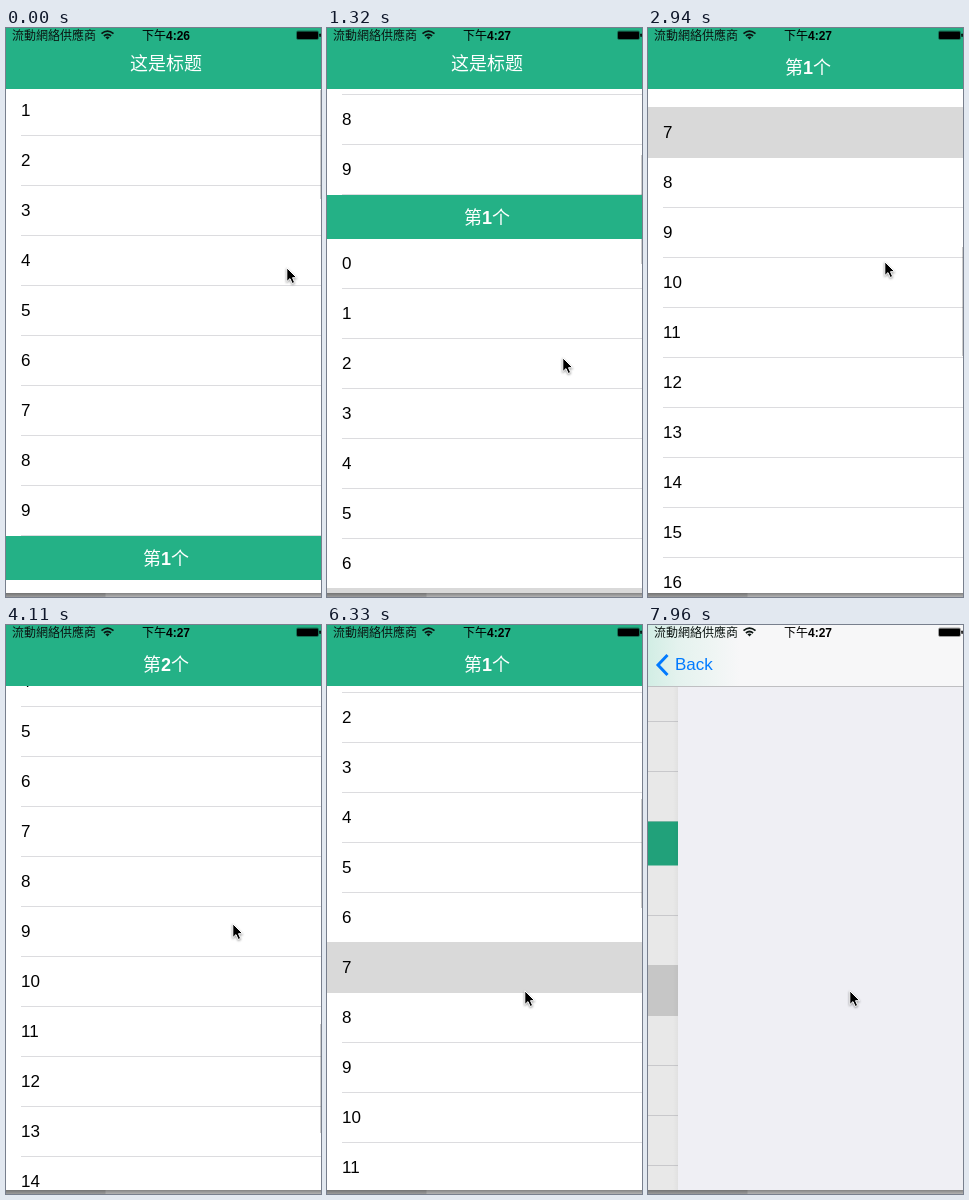
These frames come from a looping animation (315x569 px, 8000 ms). An HTML page:

```html
<!DOCTYPE html>
<html lang="zh-Hans">
<head>
<meta charset="utf-8">
<title>Sticky section list</title>
<style>
  html, body { margin: 0; width: 315px; height: 569px; overflow: hidden; background: #fff; }
  body, div { font-family: "Liberation Sans", "Noto Sans CJK SC", sans-serif; }
  #stage { position: relative; width: 315px; height: 569px; overflow: hidden; }
  #stage div, #stage svg { position: absolute; }
  #list { left: 0; top: 0; width: 320px; height: 569px; background: #fff; }
  .row { left: 0; width: 320px; height: 50px; font-size: 17px; line-height: 50px; color: #000; text-indent: 15px; }
  .row::after { content: ""; position: absolute; left: 15px; right: 0; top: 49px; height: 1px; background: #dcdcdf; }
  .row.on { top: -1px; height: 51px; line-height: 52px; background: #d9d9d9; z-index: 1; }
  .row.on::after { display: none; }
  .head, #nav { left: 0; width: 320px; background: #24b186; color: #fff; font-size: 18px; font-weight: 500; text-align: center; }
  .head { top: 0; height: 44px; line-height: 46px; z-index: 2; }
  #nav { top: 0; overflow: hidden; z-index: 3; }
  #nav div { left: 0; top: 13px; width: 320px; line-height: 46px; }
  #thumb { left: 314px; top: 0; width: 2px; height: 109px; background: rgba(0, 0, 0, .2); z-index: 2; }
  #dim { left: 0; top: 0; width: 320px; height: 569px; background: #000; z-index: 4; }
  #page { left: 0; top: 0; width: 320px; height: 569px; background: #efeff4; }
  #page::before { content: ""; position: absolute; left: -5px; top: 0; width: 5px; height: 569px;
    background: linear-gradient(90deg, transparent, rgba(0, 0, 0, .03)); }
  #bar { left: 0; top: 0; width: 320px; height: 61px; border-bottom: 1px solid #bfbfc2; background: #f7f7f8; }
  #tint { left: 0; top: 0; height: 61px; }
  #back { left: 27px; top: 18px; line-height: 44px; font-size: 17px; color: #007aff; }
  #back svg { left: -20px; top: 10px; }
  #carrier, #time { top: 1px; line-height: 15px; font-size: 12px; white-space: nowrap; color: #0b1411; }
  #carrier { left: 6px; font-family: "Liberation Sans", "Noto Sans CJK TC", sans-serif; }
  #time { left: 136px; color: #000; font-weight: 500; }
  #edge { left: 0; top: 565px; width: 315px; height: 4px;
    background: linear-gradient(rgba(0, 0, 0, .3), rgba(0, 0, 0, .05)), linear-gradient(90deg, #a4a4a4 99px, #bcbcbc 100px); }
  #cursor { left: 0; top: 0; filter: drop-shadow(0 1px 1px rgba(0, 0, 0, .4)); }
</style>
</head>
<body>
<div id="stage">
  <div id="list">
    <div id="nav"><div>这是标题</div></div>
    <div id="thumb"></div>
    <div id="dim"></div>
  </div>
  <div id="page"></div>
  <div id="bar">
    <div id="tint"></div>
    <div id="back">Back
      <svg width="16" height="24"><path d="M12.5 2L3 12l9.500 10" fill="none" stroke="#007aff" stroke-width="3"/></svg>
    </div>
  </div>
  <div id="carrier" lang="zh-Hant">流動網絡供應商</div>
  <svg width="315" height="16">
    <path d="M95.500 5.600Q101.500 .6 107.500 5.600M97.900 8Q101.500 5 105.100 8" fill="none" stroke="#0b1411" stroke-width="1.700"/>
    <path d="M99.400 9.300Q101.500 7.800 103.600 9.300L101.500 11.600Z" fill="#0b1411"/>
    <rect x="290.500" y="3" width="22" height="8.500" rx="1.500" fill="none" stroke="#000" stroke-opacity=".45" stroke-width=".8"/>
    <rect x="291" y="3.500" width="21" height="7.500" rx=".8"/>
    <rect x="313.300" y="5.500" width="1.500" height="3.500" rx=".7"/>
  </svg>
  <div id="time">下午<b>4:<span id="minute">26</span></b></div>
  <div id="edge"></div>
  <svg id="cursor" width="16" height="22">
    <path d="M.8 .8V14.600L4 11.600L6.200 16.500L8.600 15.400L6.500 10.700H10.700Z" fill="#000" stroke="#fff" stroke-width="1"/>
  </svg>
</div>
<script>
const LOOP = 8000, TICK = 147, LEAD = 7;
const ROW = 50, HEAD = 44, PIN = 17, NAV = 61, WIDTH = 320;
const SECTION = HEAD + 20 * ROW;
const TAP = 51, PUSH_TICKS = 3.7, FRICTION = 3.11;

// Where each flick begins and ends (ticks), and what it leaves behind.
const REST = { list: 508, x: 280, y: 239 };
const FLICKS = [
  { from: 2, to: 9, list: 167, x: 235, y: 329 },
  { from: 9, to: 20, list: -314, x: 236, y: 233 },
  { from: 20, to: 28, list: -1256, x: 226, y: 298 },
  { from: 28, to: 35, list: -1367, x: 192, y: 364 },
  { from: 37, to: 49, list: 196.5, x: 201, y: 365 }
];

const $ = id => document.getElementById(id);
const list = $("list");
const clamp = u => Math.max(0, Math.min(1, u));
const smooth = u => u * u * (3 - 2 * u);
const decay = u => (1 - Math.exp(-FRICTION * u)) / (1 - Math.exp(-FRICTION));
const move = (el, x, y) => { el.style.transform = `translate(${x}px,${y}px)`; };

function follow(key, n, ease) {
  let value = REST[key];
  for (const f of FLICKS) value += (f[key] - value) * ease(clamp((n - f.from) / (f.to - f.from)));
  return value;
}

function add(cls, html) {
  const el = document.createElement("div");
  el.className = cls;
  el.innerHTML = html;
  list.append(el);
  return el;
}

// Row tops are relative to the first section header.
const rows = [];
function addRows(section, count, top) {
  for (let i = 0; i < count; i++) {
    rows.push({ el: add("row", i), top: top + i * ROW, id: section + "-" + i });
  }
}
addRows(0, 10, -10 * ROW);
addRows(1, 20, HEAD);
addRows(2, 20, SECTION + HEAD);
const heads = [1, 2].map(n => add("head", `第<b>${n}</b>个`));

function drawList(n) {
  const top = follow("list", n, decay), y = Math.round(top);
  const selected = n < TAP ? "1-7" : "1-2";
  for (const r of rows) {
    r.el.classList.toggle("on", r.id === selected);
    move(r.el, 0, y + r.top);
  }
  const next = top + SECTION;
  move(heads[0], 0, Math.max(top, Math.min(PIN, next - HEAD)));
  move(heads[1], 0, Math.max(next, PIN));
  $("nav").style.height = (top > PIN ? NAV : PIN) + "px";
  move($("thumb"), 0, Math.max(62, Math.round(159 - y * .191)));
  $("thumb").style.opacity = n < TAP ? 1 : 0;
}

function drawPush(n) {
  const done = smooth(clamp((n - TAP) / PUSH_TICKS));
  const x = Math.round(WIDTH * (1 - done));
  move(list, Math.round((x - WIDTH) * .3), 0);
  move($("page"), x, 0);
  $("dim").style.opacity = .1 * done;
  $("bar").style.visibility = n > TAP ? "visible" : "hidden";
  $("tint").style.width = x + 62 + "px";
  $("tint").style.background =
    `linear-gradient(90deg, rgba(60,200,150,.2), rgba(60,200,150,.1) ${x}px, rgba(60,200,150,0))`;
  $("back").style.opacity = Math.min(1, done * 1.11);
  move($("back"), Math.max(0, (x - 30) * .3), 0);
}

function draw(now) {
  const n = Math.floor((now % LOOP + LEAD) / TICK);
  drawList(n);
  drawPush(n);
  $("minute").textContent = n < 4 ? "26" : "27";
  move($("cursor"), Math.round(follow("x", n, smooth)), Math.round(follow("y", n, smooth)));
}

const start = performance.now();
function frame() {
  draw(performance.now() - start);
  requestAnimationFrame(frame);
}
frame();
</script>
</body>
</html>
```
